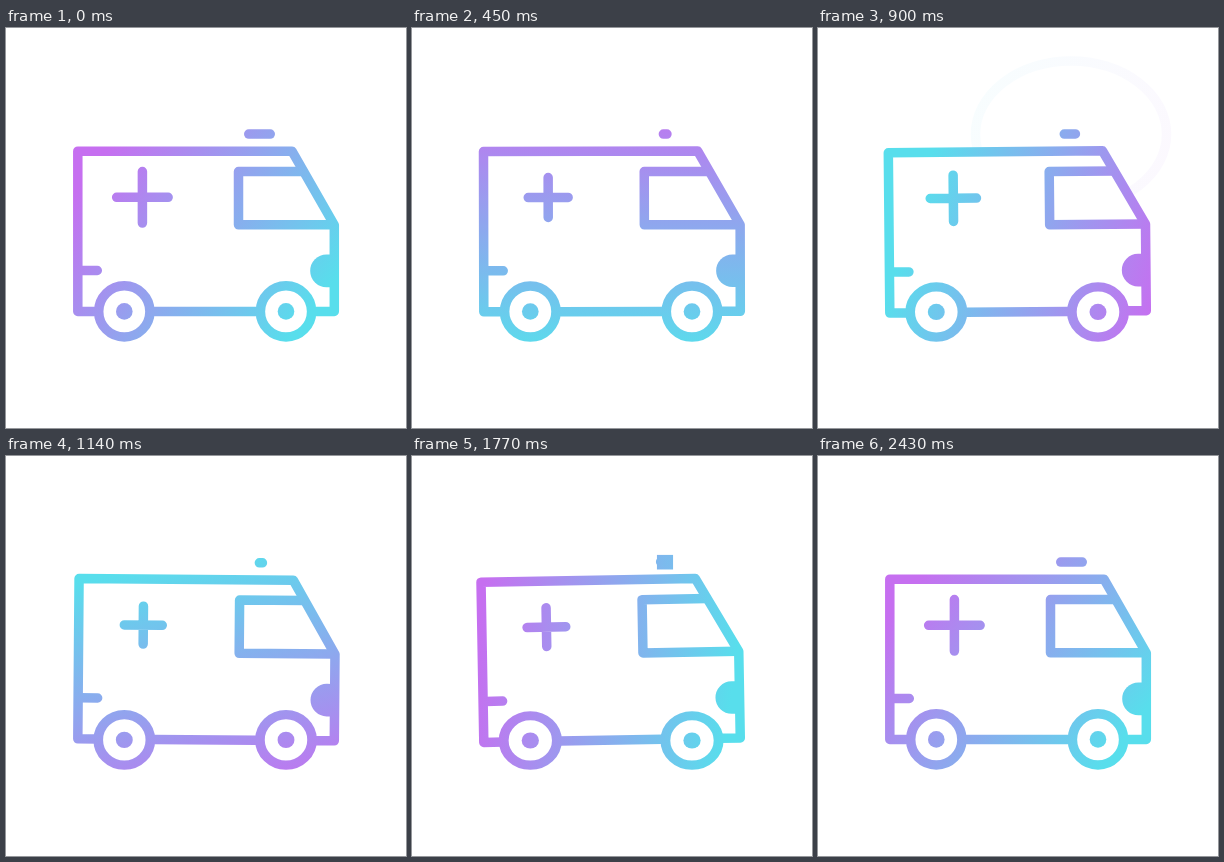
Write an HTML page that moves like this. It is 400 by 400 pixels and loops after 4460 ms.

```html
<!DOCTYPE html>
<html lang="en">
<head>
<meta charset="utf-8">
<title>Ambulance</title>
<style>
  html, body { margin: 0; width: 100%; height: 100%; overflow: hidden; background: #fff; }
  svg { display: block; width: 100vw; height: 100vh; }
  .line { fill: none; stroke: url(#tint); stroke-width: 9.5; stroke-linecap: round; stroke-linejoin: round; }
  .solid { fill: url(#tint); }
  .mask { fill: #fff; }
  #ring { stroke-linejoin: miter; }
</style>
</head>
<body>
<svg viewBox="0 0 400 400">
  <defs>
    <linearGradient id="tint" gradientUnits="userSpaceOnUse">
      <stop offset="0" stop-color="#c66ff0"/>
      <stop offset="1" stop-color="#58deec"/>
    </linearGradient>
  </defs>
  <rect id="ring" class="line"/>
  <g id="body">
    <path class="mask" d="M71.8 123.2H286L328.3 197V283.5H71.8Z"/>
    <path id="light" class="line"/>
    <path class="line" d="M91 283.5H71.8V123.2H286L328.3 197V283.5H308M148 283.5H250"/>
    <path class="line" d="M297 143.5H232.5V196.8H327M74 242.5H91.3"/>
    <path class="solid" d="M325 226.6H320.5A16.3 16.3 0 0 0 320.5 259.2H325Z"/>
    <path id="cross" class="line"/>
  </g>
  <g class="wheel"></g>
  <g class="wheel"></g>
</svg>
<script>
const LOOP = 4460, STEP = 30, ACTIVE = 2430, MOVING = 2160;
const SWING = MOVING / 2, BEAT = MOVING / 7;
const RING = { every: 2 * BEAT, lead: 82.3, life: 400, x: 253, y: 106.2 };
const WHEEL_X = [118.3, 280], WHEEL_Y = 283.4, GROUND = 313.9;
const $ = id => document.getElementById(id);
const set = (el, attrs) => { for (const k in attrs) el.setAttribute(k, attrs[k]); };

const settle = x => 1 - (1 - x) ** 1.35;
const smooth = x => x * x * (3 - 2 * x);

const wheels = [...document.querySelectorAll(".wheel")];
wheels.forEach((el, i) => {
  const circle = (cls, r) => `<circle class="${cls}" cx="${WHEEL_X[i]}" cy="${WHEEL_Y}" r="${r}"/>`;
  el.innerHTML = circle("mask", 25) + circle("line", 25.6) + circle("solid", 8.3);
});

// The gradient makes one turn and leans toward its purple end midway.
function drawTint(t) {
  const turn = smooth(settle(t / ACTIVE));
  const a = (turn * 360 + 217) * Math.PI / 180;
  const lean = 24 * Math.sin(Math.PI * turn);
  const at = r => [200 + r * Math.cos(a), 207 + r * Math.sin(a)];
  const [x1, y1] = at(lean + 130), [x2, y2] = at(lean - 130);
  set($("tint"), { x1, y1, x2, y2 });
}

// Each ring snaps open, then widens steadily while it fades.
function drawRing(t) {
  const a = (t + RING.lead) % RING.every / RING.life;
  const rx = 38 * (1 - Math.exp(-40 * a)) + 63 * a, ry = rx * 0.767;
  const shown = t > 0 && t < MOVING && a < 1;
  set($("ring"), {
    x: RING.x - rx, y: RING.y - ry, width: 2 * rx, height: 2 * ry,
    rx: rx < 8 ? 0 : rx, ry: rx < 8 ? 0 : ry,
    opacity: shown ? (1 - a) ** 1.25 : 0
  });
}

function drawVan(t) {
  const sway = t < MOVING ? Math.sin(2 * Math.PI * settle(t % SWING / SWING)) : 0;
  const squash = Math.abs(sway);
  set($("body"), { transform: `translate(0 ${0.7 * squash}) rotate(${sway} 200 284)` });
  wheels.forEach((el, i) => {
    const sx = 1 + 0.04 * squash, sy = 1 - 0.035 * squash;
    set(el, { transform:
      `translate(${WHEEL_X[i]} ${GROUND}) scale(${sx} ${sy}) translate(${-WHEEL_X[i]} ${-GROUND})` });
  });

  const beat = t < MOVING ? t / BEAT % 1 : 0;
  const arm = 51.5 - 14 * Math.sin(Math.PI * beat ** 1.5);
  const bar = 21.5 - 21 * beat ** 0.2 * (1 - beat ** 8);
  set($("cross"), { d: `M${136.4 - arm / 2} 169.3h${arm}M136.4 ${169.3 - arm / 2}v${arm}` });
  set($("light"), { d: `M${253.5 - bar / 2} 106.1h${bar}` });
}

function draw(ms) {
  const t = Math.min(ACTIVE, Math.floor(ms % LOOP / STEP) * STEP);
  drawTint(t);
  drawRing(t);
  drawVan(t);
}

let start;
function tick(now) {
  start ??= now;
  draw(Math.max(0, now - start));
  requestAnimationFrame(tick);
}
draw(0);
requestAnimationFrame(tick);
</script>
</body>
</html>
```
